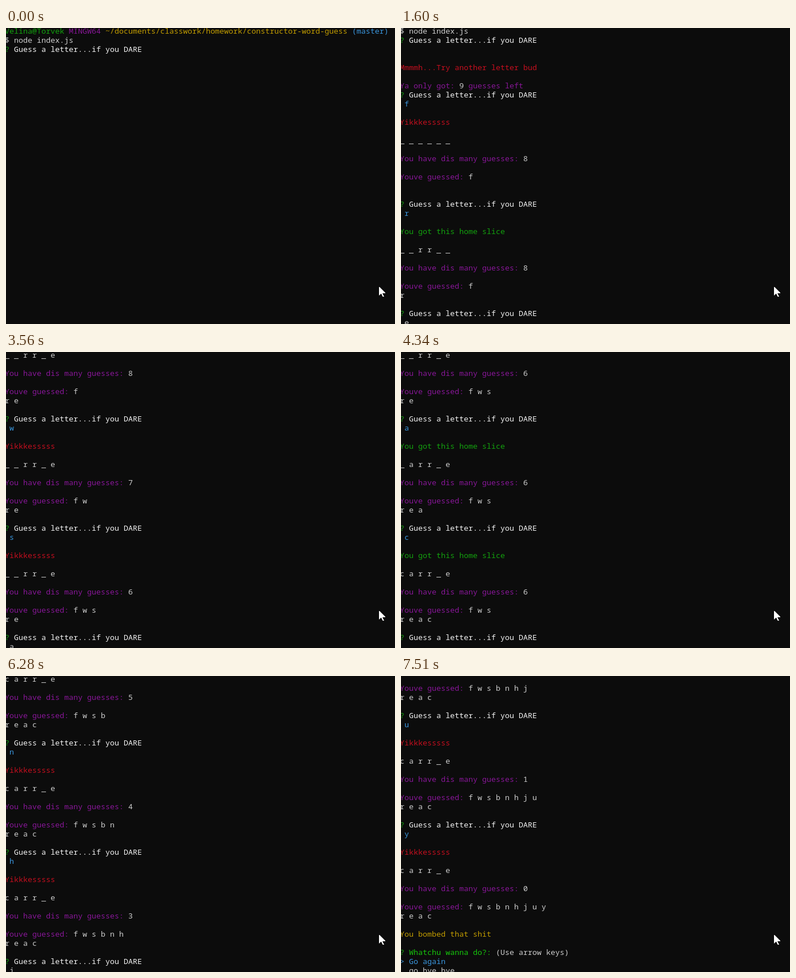
Animation, 681 px wide and 520 px high, one loop 8000 ms. Source, as an HTML page:

```html
<!DOCTYPE html>
<html lang="en">
<head>
<meta charset="utf-8">
<title>Word guess in a terminal</title>
<style>
  html, body { margin: 0; width: 100%; height: 100%; overflow: hidden; background: #0c0c0c; }
  svg { display: block; width: 100%; height: 100%; overflow: hidden; }
  text { white-space: pre; fill: #ccc; font: 13.333px "Noto Sans Mono", "DejaVu Sans Mono", monospace; }
</style>
</head>
<body>
<svg>
  <g id="screen"></g>
  <rect id="caret" width="8" height="4" fill="#f2f2f2"/>
  <path d="M653 455h1l10 10v1h-5l3 6h-2.5l-2.7-5.6L653 470z" fill="#fff"/>
</svg>
<script>
const LOOP = 8000, ROWS = 33, ROW = 16, LEFT = -2, BASELINE = 10, WORD = 'carr_e';
const GREEN = '#13a10e', LIME = '#16c60c', PURPLE = '#881798', GOLD = '#c19c00',
      CYAN = '#3a96dd', RED = '#c50f1f', WHITE = '#f2f2f2';

// Single letters are keystrokes; "clear" wipes the prompt just before its answer is printed.
const EVENTS = [
  [60, 'enter'], [190, 'f'], [320, 'enter'], [320, 'caret'], [450, 'r'],
  [1000, 'clear'], [1070, 'enter'], [1600, 'e'], [1940, 'enter'],
  [2330, 'w'], [2620, 'enter'], [3010, 's'], [3160, 'clear'], [3230, 'enter'],
  [3480, 'a'], [3720, 'clear'], [3790, 'enter'], [4030, 'c'], [4340, 'enter'],
  [4640, 'b'], [4800, 'clear'], [4870, 'enter'], [5200, 'n'], [5340, 'clear'], [5410, 'enter'],
  [5640, 'h'], [5880, 'enter'], [6280, 'j'], [6420, 'clear'], [6490, 'enter'],
  [6690, 'u'], [6830, 'clear'], [6890, 'enter'], [7290, 'y'], [7510, 'enter']
];

const screen = document.getElementById('screen');
const caret = document.getElementById('caret');
const ink = (color, text) => `<tspan style="fill:${color}">${text}</tspan>`;
const spaced = letters => [...letters].join(' ');
const PROMPT = ink(GREEN, '?') + ink(WHITE, ' Guess a letter...if you DARE');

function play(count) {
  const lines = [
    ink(GREEN, 'Velina@Torvek') + ink(PURPLE, ' MINGW64') +
      ink(GOLD, ' ~/documents/classwork/homework/constructor-word-guess') + ink(CYAN, ' (master)'),
    '$ node index.js', PROMPT, ''
  ];
  let typed = '', hits = '', misses = '', left = 9, mode = '';

  function answer() {
    lines.splice(-2, 2, PROMPT, typed && ink(CYAN, ' ' + typed));
    if (!typed) {
      lines.push('', ink(RED, 'Mmmmh...Try another letter bud'), '',
        ink(PURPLE, 'Ya only got: ') + left + ink(PURPLE, ' guesses left'), PROMPT, '');
      return;
    }
    const good = WORD.includes(typed);
    if (good) hits += typed;
    else { misses += typed; left--; }
    const shown = [...WORD].map(ch => hits.includes(ch) ? ch : '_');
    lines.push('', good ? ink(GREEN, 'You got this home slice') : ink(RED, 'Yikkkesssss'), '',
      spaced(shown), '', ink(PURPLE, 'You have dis many guesses: ') + left, '',
      ink(PURPLE, 'Youve guessed: ') + spaced(misses), spaced(hits), '');
    if (left) lines.push(PROMPT, '');
    else lines.push(ink(GOLD, 'You bombed that shit'), '',
      ink(GREEN, '?') + ink(LIME, ' Whatchu wanna do?:') + ' (Use arrow keys)',
      ink(CYAN, '&gt; Go again'), '  go bye bye');
    typed = '';
  }

  for (const [, action] of EVENTS.slice(0, count)) {
    mode = action;
    if (action === 'enter') answer();
    else if (action === 'clear') lines.splice(-2, 2, '', '');
    else if (action !== 'caret') {
      typed = action;
      lines[lines.length - 1] = ' ' + typed;
    }
  }
  return { lines, mode };
}

function draw(count) {
  const { lines, mode } = play(count);
  const top = Math.max(0, lines.length - ROWS);
  screen.innerHTML = lines.slice(top)
    .map((line, i) => `<text x="${LEFT}" y="${BASELINE + i * ROW}">${line}</text>`).join('');
  const cleared = mode === 'clear';
  const row = lines.length - top - (cleared ? 2 : 1);
  caret.style.display = cleared || mode === 'caret' ? 'inline' : 'none';
  caret.setAttribute('x', cleared ? LEFT : LEFT + 8);
  caret.setAttribute('y', row * ROW + BASELINE - 1);
}

let last = -1;
const start = performance.now();
function tick() {
  const t = (performance.now() - start) % LOOP;
  const count = EVENTS.filter(([at]) => at <= t).length;
  if (count !== last) draw(last = count);
  requestAnimationFrame(tick);
}
tick();
</script>
</body>
</html>
```
